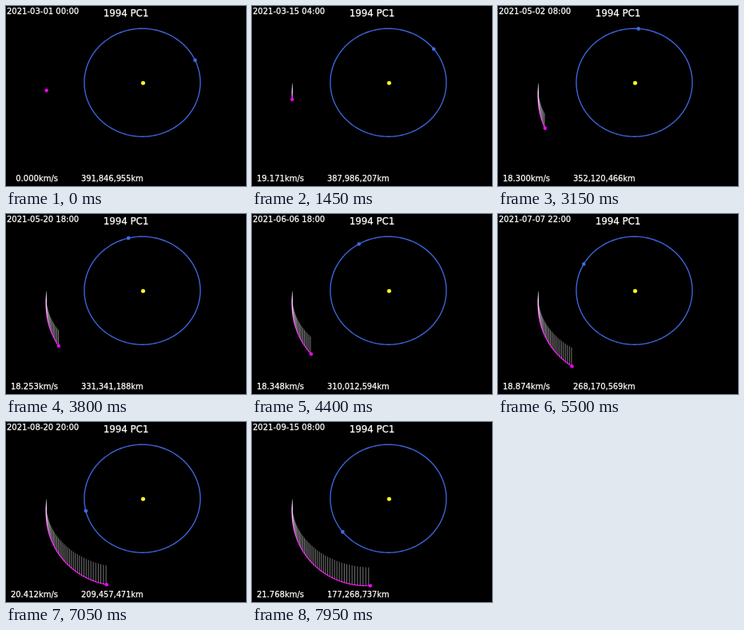
An HTML page with a canvas for the animation above (8 s loop, 300 by 225 pixels).

```html
<!DOCTYPE html>
<html lang="en">
<head>
<meta charset="utf-8">
<title>1994 PC1</title>
<style>
html, body { margin: 0; width: 100%; height: 100%; overflow: hidden; background: #000; }
canvas { display: block; width: 300px; height: 225px; }
</style>
</head>
<body>
<canvas id="stage"></canvas>
<script>
const LOOP = 8000, HOLD = 1000, STEP = 50;
const DAYS = 34 / 24;         // simulated days per step
const DROP = 4;               // days between drop lines
const AU = 72.5, AU_KM = 149597870.7;
const SUN = { x: 171.4, y: 96.3 };
const START = Date.UTC(2021, 2, 1);
const FONT = '"DejaVu Sans", Verdana, sans-serif';
const rad = deg => deg * Math.PI / 180;

// View: rotation about the ecliptic pole, then tilt towards the viewer
const TURN = rad(135.1), TILT = rad(21.4);

// Angles in degrees; mean anomaly at START
const EARTH = { a: 1, e: 0.0167, incl: 0, node: 0, peri: 102.95, mean: 55.73 };
const ASTEROID = { a: 1.3464, e: 0.3285, incl: 33.47, node: 117.9, peri: 47.6, mean: 131.38 };

const canvas = document.getElementById('stage');
const scale = window.devicePixelRatio || 1;
canvas.width = 300 * scale;
canvas.height = 225 * scale;
const ctx = canvas.getContext('2d');
ctx.scale(scale, scale);
ctx.lineJoin = 'round';

// Heliocentric ecliptic position in AU, from Kepler's equation
function locate({ a, e, incl, node, peri, mean }, day) {
  const m = rad(mean + 0.98561 * day / a ** 1.5);
  let E = m;
  for (let i = 0; i < 6; i++) E -= (E - e * Math.sin(E) - m) / (1 - e * Math.cos(E));
  const r = a * (1 - e * Math.cos(E));
  const u = rad(peri) +
    Math.atan2(Math.sqrt(1 - e * e) * Math.sin(E), Math.cos(E) - e);
  const along = r * Math.cos(u), across = r * Math.sin(u);
  const flat = across * Math.cos(rad(incl));
  const c = Math.cos(rad(node)), s = Math.sin(rad(node));
  return { x: c * along - s * flat, y: s * along + c * flat, z: across * Math.sin(rad(incl)), r };
}

function project({ x, y, z }) {
  const c = Math.cos(TURN), s = Math.sin(TURN);
  return [
    SUN.x + AU * (c * x + s * y),
    SUN.y - AU * ((c * y - s * x) * Math.cos(TILT) + z * Math.sin(TILT))
  ];
}

const speed = r => 29.785 * Math.sqrt(2 / r - 1 / ASTEROID.a);
const distance = (p, q) => AU_KM * Math.hypot(p.x - q.x, p.y - q.y, p.z - q.z);

function tracePath(body, days, color, width) {
  ctx.strokeStyle = color;
  ctx.lineWidth = width;
  ctx.beginPath();
  for (let i = 0; i <= 200; i++) ctx.lineTo(...project(locate(body, days * i / 200)));
  ctx.stroke();
}

function drawDrops(days) {
  ctx.strokeStyle = 'rgba(255,255,255,0.7)';
  ctx.lineWidth = 0.65;
  ctx.beginPath();
  for (let day = 0; day <= days; day += DROP) {
    const p = locate(ASTEROID, day);
    ctx.moveTo(...project(p));
    ctx.lineTo(...project({ ...p, z: 0 }));
  }
  ctx.stroke();
}

function dot([x, y], r, color) {
  ctx.fillStyle = color;
  ctx.beginPath();
  ctx.arc(x, y, r, 0, 2 * Math.PI);
  ctx.fill();
}

function label(text, x, y, size, align) {
  ctx.font = `${size}px ${FONT}`;
  ctx.textAlign = align;
  ctx.fillStyle = ctx.strokeStyle = '#fff';
  ctx.lineWidth = 0.25;
  ctx.fillText(text, x, y);
  ctx.strokeText(text, x, y);
}

function draw(t) {
  const n = t < HOLD ? 0 : Math.floor((t - HOLD) / STEP) + 1;
  const day = n * DAYS;
  const earth = locate(EARTH, day), asteroid = locate(ASTEROID, day);
  ctx.fillStyle = '#000';
  ctx.fillRect(0, 0, 300, 225);

  tracePath(EARTH, 365.25, '#3b64d8', 1.4);
  if (n) {
    tracePath(ASTEROID, day, '#f0f', 1.2);
    drawDrops(day);
  }
  dot([SUN.x, SUN.y], 2.5, '#ff2');
  dot(project(earth), 2.3, '#4169e1');
  dot(project(asteroid), 2.2, '#f0f');

  const date = new Date(START + Math.round(day * 24) * 3600000).toISOString();
  label(date.slice(0, 16).replace('T', ' '), 1, 10, 10, 'left');
  label('1994 PC1', 150, 12.5, 11.8, 'center');
  label((n ? speed(asteroid.r) : 0).toFixed(3) + 'km/s', 65, 219, 10, 'right');
  label(Math.round(distance(asteroid, earth)).toLocaleString('en-US') + 'km', 94, 219, 9.8, 'left');
}

const begin = performance.now();
function tick() {
  draw((performance.now() - begin) % LOOP);
  requestAnimationFrame(tick);
}
tick();
</script>
</body>
</html>
```
